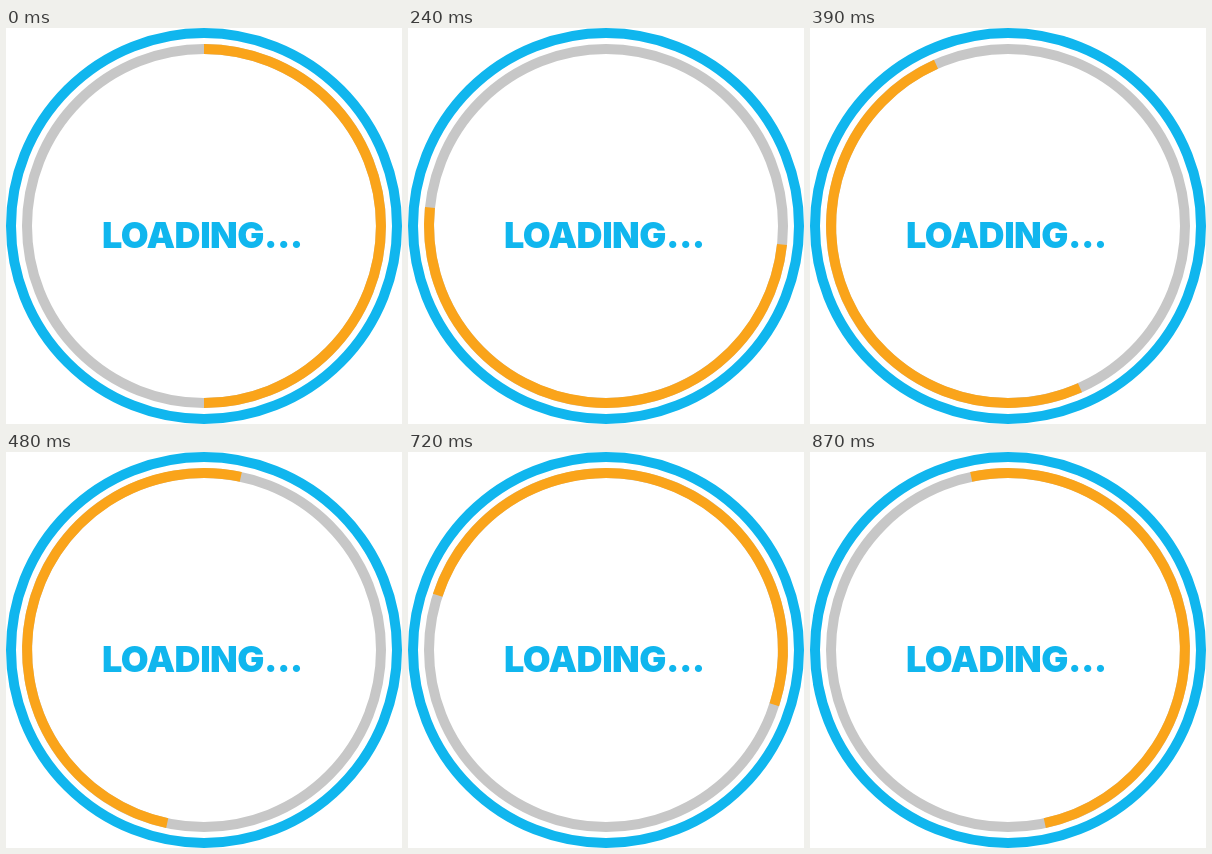
Recreate the animation shown at these times as an HTML page. Size 396 by 396 pixels, loop 0.9 s.

```html
<!DOCTYPE html>
<html lang="en">
<head>
<meta charset="utf-8">
<title>Loading</title>
<style>
  html, body { margin: 0; height: 100%; overflow: hidden; background: #fff; }
  svg { display: block; width: 100vw; height: 100vh; }
  circle, path { fill: none; stroke-width: 10; }
  text { font: 900 36px Inter, sans-serif; letter-spacing: -0.5px; fill: #10b6ee; }
</style>
</head>
<body>
<svg viewBox="0 0 396 396">
  <circle cx="198" cy="198" r="193" stroke="#10b6ee"/>
  <circle cx="198" cy="198" r="177" stroke="#c7c7c7"/>
  <path id="arc" d="M198 21a177 177 0 0 1 0 354" stroke="#faa41a"/>
  <text x="96" y="220">LOADING...</text>
</svg>
<script>
  const LOOP = 900, STEP = 30;
  const arc = document.getElementById("arc");

  function draw() {
    const step = Math.floor(performance.now() % LOOP / STEP);
    arc.setAttribute("transform", `rotate(${step * STEP / LOOP * 360} 198 198)`);
    requestAnimationFrame(draw);
  }
  draw();
</script>
</body>
</html>
```
